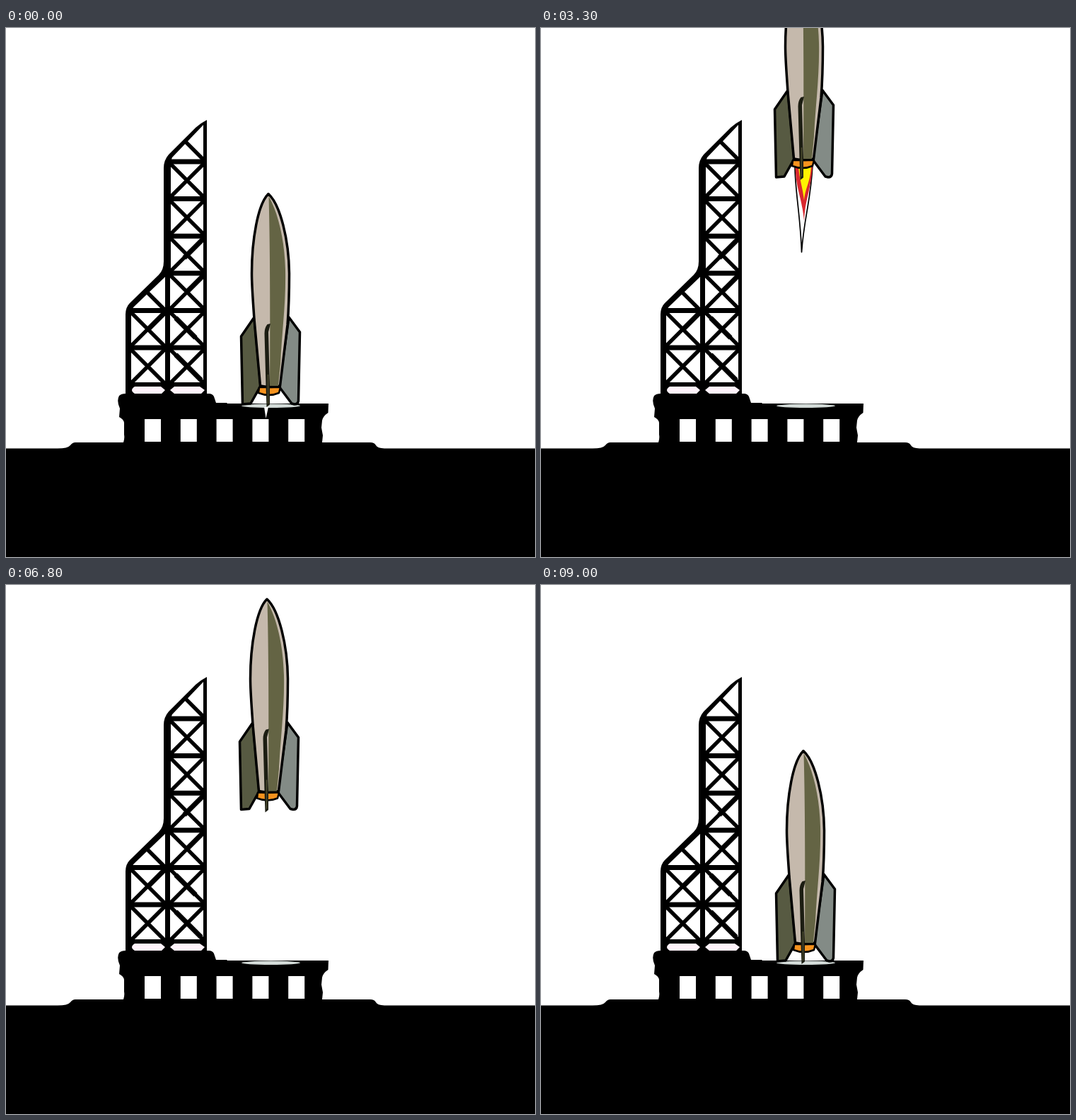
Recreate the animation shown at these times as an HTML page. Size 748 by 748 pixels, loop 9.2 s.

```html
<!DOCTYPE html>
<html lang="en">
<head>
<meta charset="utf-8">
<title>Rocket launch and landing</title>
<style>
  html, body { margin: 0; width: 100%; height: 100%; overflow: hidden; background: #fff; }
  svg { display: block; width: 100vw; height: 100vh; }
</style>
</head>
<body>
<svg viewBox="0 0 748 748">
  <!-- ground and pad -->
  <path d="M0 594.5H70Q87 595 91 590Q94 586 98 586H166Q168 580 167 575V558Q166 553 160 550L161 538Q156 527 160 520Q163 517 169 517H288Q294 518 295 524L297 530H312L313 531H456L455.5 544Q448 549 447 555L446 565L448 576L447 586H515Q521 586 523 590Q525 594 535 594.5H748V748H0Z"/>
  <path id="windows" fill="#fff"/>
  <ellipse cx="374.5" cy="534.3" rx="41.5" ry="2.7" fill="#d3dbd8"/>

  <!-- tower -->
  <path d="M284 130V518H169V405Q169 395 175 389L216 349Q223 342 223 330V198Q223 187 230 179L268 141Q276 134 284 130ZM279 137L235 183Q233 187 233 195V340Q233 346 227 350L181 394Q177 398 177 405V508H279Z" fill-rule="evenodd"/>
  <g fill="none" stroke="#000">
    <path id="bars" stroke-width="7"/>
    <path id="braces" stroke-width="5.4"/>
    <path d="M279 298L252 325M279 350L256 373M225 402L200 427M240 410L268 438M240 462L276 498" stroke-width="7"/>
  </g>
  <path d="M182 507H219L225 512L220 517H182Q174 512 182 507ZM238 507H274L281 512L276 517H238L232 512Z" fill="#fff3fb"/>

  <g id="rocket" stroke="#000" stroke-width="3.5" stroke-linejoin="round">
    <path id="spike" d="M365 536H371L367.5 552Z" fill="#fff" stroke="none"/>
    <g id="flame">
      <path d="M361 515C361 550 369 588 370.5 638C374 588 383.500 566 386 515Z" fill="#fff" stroke-width="1.700"/>
      <path d="M361.500 515C362 548 371 560 374 594C375 565 384 550 386 515Z" fill="#d9282f" stroke="none"/>
      <path d="M366 515C367 535 372 545 374 565C376 545 383 540 384 515Z" fill="#fff200" stroke="none"/>
    </g>
    <path d="M351 409L332.5 436L334.5 532L346 531L360 506Z" fill="#575a42"/>
    <path d="M400 409L415.5 430L413.5 527Q413 532 408 532L404 531L386 507Z" fill="#838b86"/>
    <path d="M358 508H388L386 516Q372 522 357 516Z" fill="#f7931e" stroke-width="2.5"/>
    <path d="M371 234.5C356 249 347.5 300 347.5 347C347.5 367 350 395 351 412L359.5 506Q372 509 387.5 506L398 420C400 395 400.5 370 400.5 347C400 300 388 250 371 234.5Z" fill="#c5b9ac"/>
    <path d="M371.5 238C385 262 394 300 395 342C396 390 390 430 388 475L385 506H373Q374 330 371.5 238Z" fill="#646444" stroke="none"/>
    <path d="M374 418L369.5 419Q365.5 424 365.5 432L367.5 506L368.5 536L373 532.5V505L371 430Z" fill="#1c1d12" stroke="none"/>
    <path d="M370.5 490V531" stroke="#4c4d30" stroke-width="1.5"/>
  </g>
</svg>
<script>
const el = id => document.getElementById(id);
const LOOP = 9200, REST = 234;

// Key poses: time, nose height, and how long each step towards the next pose is held.
const poses = [
  [0, REST, 200], [800, 158, 100], [1700, -39, 100], [1800, -76, 500], [2300, -87, 3000],
  [5300, -72, 500], [6300, -39, 200], [6800, 19.5, 100], [7200, 82, 200], [7600, 131, 200],
  [8400, 199, 200], [9000, REST, 200], [LOOP, REST, 200]
];

function noseHeight(t) {
  const i = poses.findLastIndex(p => p[0] <= t);
  const [t0, y0, hold] = poses[i], [t1, y1] = poses[i + 1];
  const held = Math.floor((t - t0) / hold) * hold;
  return y0 + (y1 - y0) * held / (t1 - t0);
}

function flameOn(t) {
  if (t < 2300) return t >= 200;
  return t < 4800 && Math.floor((t - 2300) / 500) % 2 === 0; // engine sputters while hovering
}

function buildTower() {
  let windows = '', bars = 'M228.5 345V517';
  let braces = 'M253 160L281 188M199 373L227 401';
  for (let i = 0; i < 5; i++) windows += `M${196 + i * 50.8} 553h23v32h-23z`;
  for (let i = 0; i < 7; i++) {
    const y = 189 + i * 52.6;
    bars += `M${i > 3 ? 173 : 228} ${y}H282`;
    if (i === 6) break;
    const cross = x => `M${x} ${y + 2}l49 49m-49 0l49 -49`;
    braces += cross(231.5) + (i > 3 ? cross(176) : '');
  }
  el('windows').setAttribute('d', windows);
  el('bars').setAttribute('d', bars);
  el('braces').setAttribute('d', braces);
}

function draw(t) {
  const lift = REST - noseHeight(t);
  const drift = -2 * Math.min(1, lift / 119);
  const size = Math.min(1, 0.31 + lift / 145);
  el('rocket').setAttribute('transform', `translate(${drift} ${-lift})`);
  el('flame').setAttribute('transform', `translate(0 515) scale(1 ${size}) translate(0 -515)`);
  el('flame').style.display = flameOn(t) ? '' : 'none';
  el('spike').style.display = t < 200 ? '' : 'none';
}

buildTower();
const start = performance.now();
(function tick() {
  draw((performance.now() - start) % LOOP);
  requestAnimationFrame(tick);
})();
</script>
</body>
</html>
```
